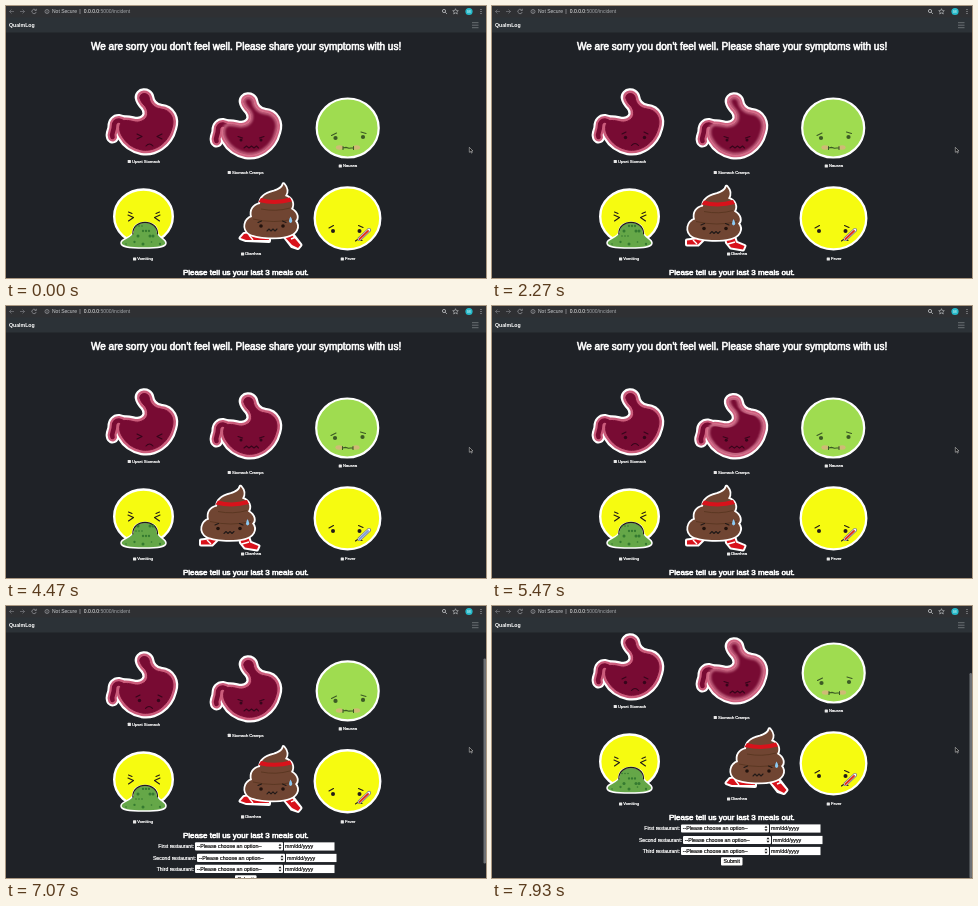
Animation, 480 px wide and 272 px high, one loop 8 s. Source, as an HTML page:

```html
<!DOCTYPE html>
<html lang="en">
<head>
<meta charset="utf-8">
<title>Symptoms</title>
<style>
  html, body { margin: 0; width: 100%; height: 100%; overflow: hidden; background: #1f2227; }
  svg { display: block; width: 100vw; height: 100vh; }
  text { font-family: "Liberation Sans", Arial, sans-serif; fill: #fff; white-space: pre; }
  .heavy { stroke: #fff; stroke-width: .62; stroke-linejoin: round; }
  .label { font-size: 4.1px; stroke: #fff; stroke-width: .22; }
  .field { font-size: 5.1px; stroke: #fff; stroke-width: .22; }
  .dark { font-size: 5.3px; fill: #111; stroke: #111; stroke-width: .2; }
  .ink { fill: none; stroke: #221a18; stroke-width: 1.1; stroke-linecap: round; stroke-linejoin: round; }
  .wine { stroke: #35051a; }
  .moss { stroke: #3c5a25; }
  .rim { stroke: #fff; stroke-linejoin: round; stroke-linecap: round; }
</style>
</head>
<body>
<svg viewBox="0 0 480 272" preserveAspectRatio="none">
  <defs>
    <filter id="soft" x="-20%" y="-20%" width="140%" height="140%"><feGaussianBlur stdDeviation=".8"/></filter>
    <path id="belly" d="M134 92C133 86.500 142 86 143 91C144 98 148 102 155 103C165 104 169 113 166 122C162 138 148 146 136 144C126 142 120 137 116 130C112 124 113 115 119 114.500C126 114 130 118 136 115C143 112 143 105 139 100C136 97 134.500 95 134 92Z"/>
    <path id="gut" d="M121 124C117 111 108 113 108 120C108 126 105 127 106.500 131" fill="none"/>
    <g id="stomach" stroke-linejoin="round" stroke-linecap="round">
      <g stroke="#fff"><use href="#gut" stroke-width="13"/><use href="#belly" fill="#fff" stroke-width="10.500"/></g>
      <g stroke="#cb5c7b"><use href="#gut" stroke-width="9"/><use href="#belly" fill="#cb5c7b" stroke-width="6"/></g>
      <g stroke="#780b33"><use href="#gut" stroke-width="4.600"/><use href="#belly" fill="#780b33" stroke-width="1"/></g>
    </g>
  </defs>

  <rect width="480" height="272" fill="#1f2227"/>

  <g id="page">
    <text class="heavy" x="85" y="43.700" font-size="10">We are sorry you don't feel well. Please share your symptoms with us!</text>

    <g id="upset">
      <use href="#stomach"/>
      <path id="squeezed" class="ink wine" d="M131 128l5 2.600l-5 2.400M156 128l-5 2.600l5 2.400M140 140q3.500 -4 7 0"/>
      <g id="sad">
        <circle cx="133.500" cy="131.500" r="1.700" fill="#35051a"/><circle cx="152.500" cy="131.500" r="1.700" fill="#35051a"/>
        <path class="ink wine" d="M130 128l4 -2M156 128l-4 -2M139.500 139.500q3.500 -4 7 0"/>
      </g>
    </g>

    <g id="cramps">
      <g transform="translate(104 4)">
        <use href="#stomach"/>
        <g id="ache" filter="url(#soft)" fill="none" stroke="#e2879f" opacity=".7">
          <use href="#belly" fill="none" stroke-width="3"/>
        </g>
        <circle cx="131" cy="130" r="1.500" fill="#35051a"/><circle cx="151" cy="130" r="1.500" fill="#35051a"/>
        <path class="ink wine" d="M128 126.500l4.500 1.500M154 126.500l-4.500 1.500M134 138l2.500 -2l2.500 2l2.500 -2l2.500 2l2.500 -2l2 2"/>
      </g>
    </g>

    <g id="nausea">
      <ellipse class="rim" cx="341.700" cy="122" rx="31" ry="29.500" fill="#9fdc50" stroke-width="2.200"/>
      <g fill="#e9a98a" opacity=".65"><ellipse cx="333.500" cy="141.500" rx="3.600" ry="2.200"/><ellipse cx="350.500" cy="141.500" rx="3.600" ry="2.200"/></g>
      <g fill="#3c5a25"><circle cx="329.500" cy="132" r="2.100"/><circle cx="357" cy="131" r="2.100"/></g>
      <path class="ink moss" d="M325.500 129.500l5 -2.500M360 127.500l-5 -1.500M337 140.500v3M337 142l3 -.6l3 .8l4.500 -.4M347.500 140.500v3"/>
    </g>

    <g id="vomiting">
      <ellipse class="rim" cx="137.500" cy="210.500" rx="29.300" ry="27" fill="#f6fb10" stroke-width="2.400"/>
      <path class="ink" d="M122 209l5.500 2.500l-5 3.500M154 209l-5.500 2.500l5 3.500M122.500 206l3.500 1.500M153.500 206l-3.500 1.500"/>
      <path class="rim" d="M127 226C127 213 151 213 151.500 226C152 232 160 232 160 237C160 241 153 242 138 242C122 242 115 241 115 237C115 232 126 232 127 226Z" fill="#65a748" stroke-width="1.500"/>
      <path class="ink" d="M126.800 228C126.500 212.500 151.500 212.500 151.600 228"/>
      <g id="bits" fill="#357a30"></g>
    </g>

    <g id="poop">
      <g id="strideRight">
        <path class="rim" d="M248 227L238 228L234.500 232L240 234L263 235L263 229ZM276 227L286 228L294.500 239L292 242L286 240Z" fill="#fff" stroke-width="4"/>
        <path d="M248 226L238 228L234.500 232L240 234L263 234L263 229ZM276 228L285 228L294.500 239L292 242L286 239Z" fill="#d8121b"/>
        <path d="M243 229l4 5M285 233l5 -2" stroke="#fff" stroke-width="1.400"/>
      </g>
      <g id="strideLeft">
        <path class="rim" d="M252 227L246 231L238 232L238 236L249 236L254 231ZM277 229L278 234L282 239L294 241L295.500 237.500L287 234L285 228Z" fill="#fff" stroke-width="4"/>
        <path d="M252 227L246 231L238 232L238 236L249 236L254 231ZM277 229L278 234L282 239L294 241L295.500 237.500L287 234L285 228Z" fill="#d8121b"/>
        <path d="M244 231.500l4 4M279 235.500l7 -2" stroke="#fff" stroke-width="1.400"/>
      </g>
      <path class="rim" style="paint-order:stroke" d="M277.500 178C282 183 281 187 279 190C286 192 288 198 285 203C292 207 292 213 289 215C294 221 290 228 281 230C268 233 250 231 244 228C236 223 239 213 246 211C244 204 248 199 254 198C254 190 262 187 268 185.500C273 184 276.500 182 277.500 178Z" fill="#704532" stroke-width="3.600"/>
      <path d="M255 203Q270 206 284 202M247 213Q268 218 288 213" fill="none" stroke="#56341f" stroke-width=".8"/>
      <path d="M255 192Q269 196 284 191.500L286 195.500Q270 200 252.500 196Z" fill="#d8121b"/>
      <circle cx="255" cy="220" r="1.800" fill="#21120d"/><circle cx="277" cy="220" r="1.800" fill="#21120d"/>
      <path class="ink" d="M252 216.500l3.500 -1.500M280 216.500l-3.500 -1.500M261 225l2 -2l2 2l2 -2l2 2l2 -2"/>
      <path d="M284.500 210.500Q288 216 284.500 217Q281.500 216 284.500 210.500Z" fill="#8cc9f2"/>
    </g>

    <g id="fever">
      <ellipse class="rim" cx="341.500" cy="212.300" rx="32.800" ry="31" fill="#f6fb10" stroke-width="2.300"/>
      <circle cx="327" cy="225" r="2" fill="#221a18"/><circle cx="353.500" cy="225" r="2" fill="#221a18"/>
      <path class="ink" d="M323 222l4.500 -2.500M357 221.500l-4.500 -2M349.500 235q3 -3 6.500 -.5"/>
      <path d="M353.500 233L363 224" stroke="#6f7688" stroke-width="4" stroke-linecap="round"/>
      <path d="M353.500 233L363 224" stroke="#f4f4f4" stroke-width="2.600" stroke-linecap="round"/>
      <path id="mercury" d="M353.500 233L362 225" stroke-width="1.900" stroke-linecap="round"/>
    </g>

    <g id="labels"></g>
    <text class="heavy" x="177" y="268.600" font-size="8">Please tell us your last 3 meals out.</text>
    <g id="rows"></g>
    <rect x="229" y="306.300" width="21.500" height="8.200" rx="1" fill="#fff"/>
    <text class="field dark" x="239.700" y="312.300" text-anchor="middle">Submit</text>
  </g>

  <rect id="thumb" x="477.500" width="2.500" height="205" rx="1.200" fill="#6d7074"/>

  <g>
    <rect y="11" width="480" height="15.500" fill="#2c3237"/>
    <text x="3" y="20.800" font-size="5.200" font-weight="700">QualmLog</text>
    <path d="M466 16.700h6.500M466 19.200h6.500M466 21.700h6.500" stroke="#85888b" stroke-width=".7"/>
    <rect width="480" height="11.300" fill="#2f3033"/>
    <g fill="none" stroke="#8d8f93" stroke-width=".8">
      <path d="M8 5.500H3.500M5.500 3.500l-2 2l2 2M14 5.500h4.500M16.500 3.500l2 2l-2 2" opacity=".7"/>
      <path d="M29.700 4a2.200 2.200 0 1 0 .5 2M30.300 2.800v1.700h-1.700"/>
      <circle cx="41" cy="5.500" r="2"/><path d="M41 5.200v1.500M41 4v.5M74 3v5"/>
      <g stroke="#c2c4c7"><circle cx="438" cy="5" r="1.600"/><path d="M439.200 6.200l1.700 1.700"/>
      <path d="M449.500 2.700l.8 1.900l2 .1l-1.500 1.300l.5 2l-1.800 -1.100l-1.800 1.100l.5 -2l-1.500 -1.300l2 -.1z" stroke-width=".6"/></g>
    </g>
    <text x="46" y="7.300" font-size="5" style="fill:#c9cbce">Not Secure</text>
    <text x="77.800" y="7.300" font-size="5">0.0.0.0<tspan fill="#a3a6aa">:5000/incident</tspan></text>
    <circle cx="463" cy="5.500" r="3.600" fill="#25b9c9"/>
    <text x="463" y="7" font-size="4" text-anchor="middle">M</text>
    <path d="M475 3.500v.01M475 5.500v.01M475 7.500v.01" stroke="#c2c4c7" stroke-width="1.100" stroke-linecap="round"/>
  </g>
  <path d="M463.300 141.300v5l1.200 -1l.8 1.800l.9 -.4l-.8 -1.700h1.600z" fill="#111" stroke="#ddd" stroke-width=".5"/>
</svg>
<script>
const LOOP = 8000;
const el = id => document.getElementById(id);
const show = (id, on) => el(id).setAttribute("display", on ? "inline" : "none");
const move = (id, value) => el(id).setAttribute("transform", value);
const scaleAt = (x, y, sx, sy) => `translate(${x} ${y}) scale(${sx} ${sy}) translate(${-x} ${-y})`;

const labels = [
  ["Upset Stomach", 122, 155.5], ["Stomach Cramps", 222, 166.5], ["Nausea", 333, 160],
  ["Vomiting", 127.3, 253], ["Diarrhea", 235.3, 248], ["Fever", 335, 253]
];
el("labels").innerHTML = labels.map(([name, x, y]) =>
  `<rect x="${x - .3}" y="${y - 1.6}" width="3.200" height="3.200" rx=".5" fill="#e8e8e8"/>
   <text class="label" x="${x + 4}" y="${y + 1.4}">${name}</text>`).join("");

const rows = [["First", 189, 277.5], ["Second", 191, 289], ["Third", 189, 300]];
el("rows").innerHTML = rows.map(([nth, box, y]) =>
  `<text class="field" x="${box - 1}" y="${y + 1.9}" text-anchor="end">${nth} restaurant:</text>
   <rect x="${box}" y="${y - 4.1}" width="88" height="8.200" rx="1" fill="#fff"/>
   <text class="field dark" x="${box + 1.8}" y="${y + 1.8}">--Please choose an option--</text>
   <path d="M${box + 83.5} ${y - .7}l1.500 -2l1.500 2zM${box + 83.5} ${y + .7}l1.500 2l1.500 -2z" fill="#111"/>
   <rect x="${box + 89}" y="${y - 4.1}" width="50.500" height="8.200" fill="#fff"/>
   <text class="field dark" x="${box + 90}" y="${y + 1.8}">mm/dd/yyyy</text>`).join("");

function scrollAt(t) {
  const start = 6200, coast = 7070, end = 7910;
  if (t < start) return 0;
  if (t < coast) return 37 * (t - start) / (coast - start);
  const left = 1 - Math.min(1, (t - coast) / (end - coast));
  return 55 - 18 * left * left;
}

function drawBits(t) {
  const fall = Math.floor(t / 100) % 6;
  let out = "";
  for (let i = 0; i < 14; i++) {
    const low = i > 8;
    const x = low ? 120 + (i - 9) * 8.5 : 130 + (i * 7) % 18;
    const y = low ? 236 + i % 2 * 2 : 220 + (i * 5 + fall * 2.5) % 15;
    out += `<circle cx="${x}" cy="${y}" r="${.8 + i % 3 * .35}"/>`;
  }
  el("bits").innerHTML = out;
}

function draw(t) {
  const beat = t % 1000;
  const left = beat >= 250 && beat < 750;
  const scroll = scrollAt(t);
  move("page", `translate(0 ${-scroll})`);
  show("thumb", scroll > 0);
  el("thumb").setAttribute("y", 22 + .82 * scroll);

  const upset = t % 1500;
  const squeezed = upset < 300 || upset >= 1200;
  show("squeezed", squeezed);
  show("sad", !squeezed);

  const cramp = t % 2000;
  show("ache", cramp < 300 || cramp >= 1300);
  const wide = cramp >= 1300 && cramp < 1700;
  move("cramps", wide ? scaleAt(275, 154, 1.02, .99) : "");

  move("nausea", left ? "translate(-.5 0)" : "");

  show("strideLeft", left);
  show("strideRight", !left);
  move("poop", left ? "translate(-43 2.500)" : "");

  const heat = t % 800;
  el("mercury").setAttribute("stroke", heat >= 230 && heat < 560 ? "#7f9cd8" : "#e0301e");
  drawBits(t);
}

function tick(now) {
  draw(now % LOOP);
  requestAnimationFrame(tick);
}
draw(0);
requestAnimationFrame(tick);
</script>
</body>
</html>
```
